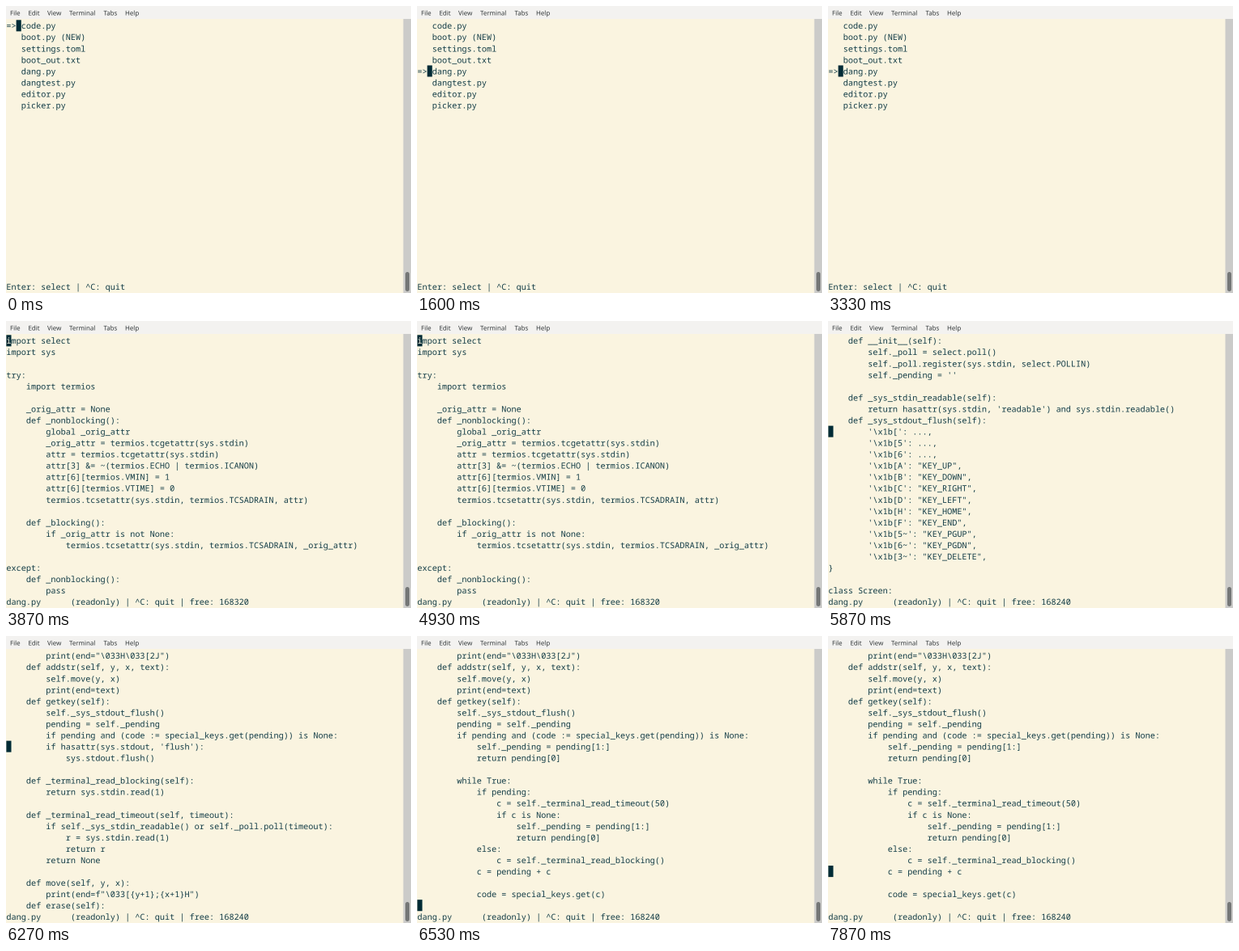
Recreate the animation shown at these times as an HTML page with a canvas. Size 500 px wide and 355 px high, loop 8000 ms.

```html
<!DOCTYPE html>
<html lang="en">
<head>
<meta charset="utf-8">
<title>Terminal editor</title>
<style>
html, body { margin: 0; width: 100%; height: 100%; overflow: hidden; background: #faf4e0; }
canvas { display: block; width: 500px; height: 355px; }
</style>
</head>
<body>
<canvas id="stage" width="1000" height="710"></canvas>
<script>
const ctx = document.getElementById('stage').getContext('2d');
// Drawn at double size, so the small text is softly smoothed.
ctx.scale(2, 2);
ctx.textRendering = 'geometricPrecision';

const LOOP = 8000, ROWS = 23;
const CELL_W = 6.12, CELL_H = 14.04, LEFT = 0.4, TOP = 17.3, ASCENT = 10.9;
const PAPER = '#faf4e0', INK = '#123c46', CURSOR = '#002b36';

const menu = [['File', 5], ['Edit', 27.5], ['View', 51], ['Terminal', 78],
  ['Tabs', 120.5], ['Help', 147]];

const files = ['code.py', 'boot.py (NEW)', 'settings.toml', 'boot_out.txt',
  'dang.py', 'dangtest.py', 'editor.py', 'picker.py'];

const source = String.raw`import select
import sys

try:
    import termios

    _orig_attr = None
    def _nonblocking():
        global _orig_attr
        _orig_attr = termios.tcgetattr(sys.stdin)
        attr = termios.tcgetattr(sys.stdin)
        attr[3] &= ~(termios.ECHO | termios.ICANON)
        attr[6][termios.VMIN] = 1
        attr[6][termios.VTIME] = 0
        termios.tcsetattr(sys.stdin, termios.TCSADRAIN, attr)

    def _blocking():
        if _orig_attr is not None:
            termios.tcsetattr(sys.stdin, termios.TCSADRAIN, _orig_attr)

except:
    def _nonblocking():
        pass

    def _blocking():
        pass


special_keys = {
        # all prefixes of special keys must
        # be entered as Ellipsis
        '\x1b': ...,
        '\x1b[': ...,
        '\x1b[5': ...,
        '\x1b[6': ...,
        '\x1b[A': "KEY_UP",
        '\x1b[B': "KEY_DOWN",
        '\x1b[C': "KEY_RIGHT",
        '\x1b[D': "KEY_LEFT",
        '\x1b[H': "KEY_HOME",
        '\x1b[F': "KEY_END",
        '\x1b[5~': "KEY_PGUP",
        '\x1b[6~': "KEY_PGDN",
        '\x1b[3~': "KEY_DELETE",
}

class Screen:
    def __init__(self):
        self._poll = select.poll()
        self._poll.register(sys.stdin, select.POLLIN)
        self._pending = ''

    def _sys_stdin_readable(self):
        return hasattr(sys.stdin, 'readable') and sys.stdin.readable()
    def _sys_stdout_flush(self):
        if hasattr(sys.stdout, 'flush'):
            sys.stdout.flush()

    def _terminal_read_blocking(self):
        return sys.stdin.read(1)

    def _terminal_read_timeout(self, timeout):
        if self._sys_stdin_readable() or self._poll.poll(timeout):
            r = sys.stdin.read(1)
            return r
        return None

    def move(self, y, x):
        print(end=f"\033[{y+1};{x+1}H")
    def erase(self):
        print(end="\033H\033[2J")
    def addstr(self, y, x, text):
        self.move(y, x)
        print(end=text)
    def getkey(self):
        self._sys_stdout_flush()
        pending = self._pending
        if pending and (code := special_keys.get(pending)) is None:
            self._pending = pending[1:]
            return pending[0]

        while True:
            if pending:
                c = self._terminal_read_timeout(50)
                if c is None:
                    self._pending = pending[1:]
                    return pending[0]
            else:
                c = self._terminal_read_blocking()
            c = pending + c

            code = special_keys.get(c)
`.split('\n');

const DOWN_KEYS = [1200, 1330, 1470, 1600];
const OPEN = 3730, OPENED = 3870;
const PAGE_START = 5070, PAGE_STEP = 400, PAGES = 4;
const PAINT_HALF = 130, PAINT_DONE = 260;
const UP_KEYS = [7600, 7730, 7870];

const pressed = (keys, t) => keys.filter(k => t >= k).length;
const pageTop = page => page < 0 ? 0 : 1 + page * ROWS;

function print(text, row, col = 0, color = INK) {
  ctx.fillStyle = color;
  ctx.fillText(text, LEFT + col * CELL_W, TOP + row * CELL_H + ASCENT);
}

function drawCursor(row, col, char = '') {
  ctx.fillStyle = CURSOR;
  ctx.fillRect(LEFT + col * CELL_W, TOP + row * CELL_H, CELL_W, CELL_H);
  print(char, row, col, PAPER);
}

function drawPicker(t) {
  const row = pressed(DOWN_KEYS, t);
  files.forEach((name, i) => print(name, i, 3));
  print('=>', row);
  drawCursor(row, 2);
  print('Enter: select | ^C: quit', ROWS);
}

function drawOpening() {
  const painted = 12;
  source.slice(0, painted).forEach((line, r) => print(line, r));
  drawCursor(painted, 0);
}

// Each page is repainted from the top, over the page before it.
function drawEditor(t) {
  const page = Math.min(PAGES - 1, Math.floor((t - PAGE_START) / PAGE_STEP));
  const age = t - PAGE_START - page * PAGE_STEP;
  const painted = page < 0 || age >= PAINT_DONE ? ROWS : age >= PAINT_HALF ? 17 : 8;
  for (let r = 0; r < ROWS; r++) {
    print(source[pageTop(r < painted ? page : page - 1) + r], r);
  }
  if (page < 0) drawCursor(0, 0, source[0][0]);
  else if (painted < ROWS) drawCursor(painted, 0);
  else drawCursor(ROWS - 1 - pressed(UP_KEYS, t), 0);
  const free = t < PAGE_START + PAINT_DONE ? 168320 : 168240;
  print('dang.py      (readonly) | ^C: quit | free: ' + free, ROWS);
}

function drawWindow() {
  ctx.fillStyle = PAPER;
  ctx.fillRect(0, 0, 500, 355);
  ctx.fillStyle = '#f3f2f0';
  ctx.fillRect(0, 0, 500, 16);
  ctx.fillStyle = '#cbcbc9';
  ctx.fillRect(490.5, 16, 9.5, 339);
  ctx.fillStyle = '#757777';
  ctx.beginPath();
  ctx.roundRect(493, 329, 5, 24, 2.5);
  ctx.fill();
  ctx.font = '7.9px "Noto Sans", sans-serif';
  ctx.fillStyle = '#33383a';
  menu.forEach(([label, x]) => ctx.fillText(label, x, 11.3));
}

const start = performance.now();

function frame() {
  const t = (performance.now() - start) % LOOP;
  drawWindow();
  ctx.font = '10.2px "Noto Sans Mono", monospace';
  if (t < OPEN) drawPicker(t);
  else if (t < OPENED) drawOpening();
  else drawEditor(t);
  requestAnimationFrame(frame);
}
frame();
</script>
</body>
</html>
```
